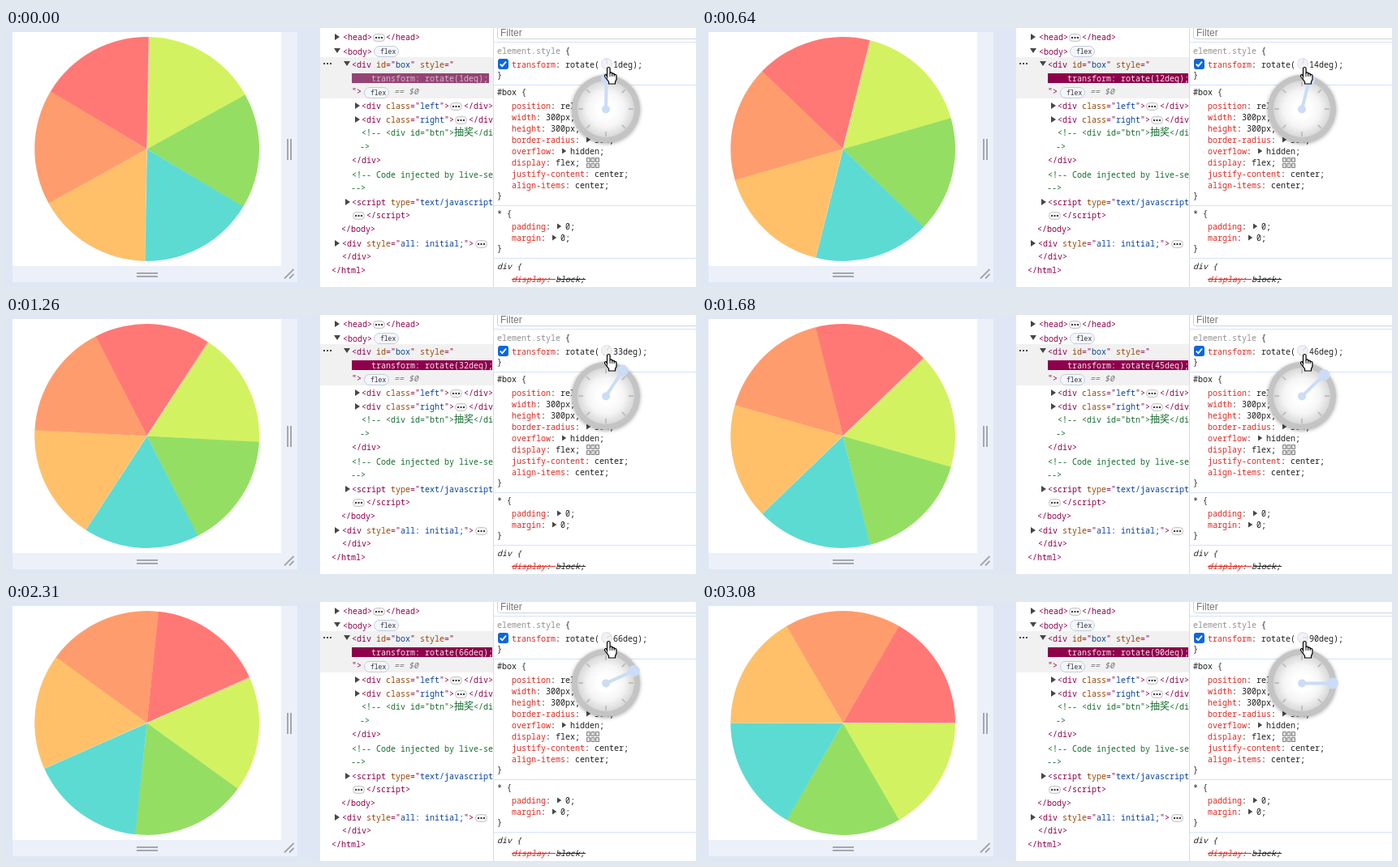
Write an HTML page with a canvas that moves like this. It is 850x320 px and loops after 3150 ms.

```html
<!DOCTYPE html>
<html lang="en">
<head>
<meta charset="utf-8">
<title>Rotating wheel</title>
<style>
  html, body { margin: 0; width: 100%; height: 100%; overflow: hidden; background: #dfe7f5; }
  canvas { display: block; }
</style>
</head>
<body>
<canvas id="stage" width="850" height="320"></canvas>
<script>
const ctx = document.getElementById('stage').getContext('2d');
const LOOP = 3150;
const MONO = '10px "Noto Sans Mono", "DejaVu Sans Mono", monospace';
const CJK = '12px "Noto Sans CJK SC", "Noto Sans CJK", sans-serif';
const C = {
  tag: '#8e004b', attr: '#994500', value: '#0842a0', note: '#146c2e',
  prop: '#dc2a22', ink: '#1f1f1f', dim: '#919191', rule: '#d3e3fd'
};
const SLICES = ['#d3f261', '#95de64', '#5cdbd3', '#ffc069', '#ff9c6e', '#ff7875'];
const RAD = Math.PI / 180;

// Time and value pairs for the live angle and the slightly late markup.
const ANGLE = [[90, 1], [350, 5], [920, 22], [1680, 46], [2310, 66], [2590, 75], [3080, 90]];
const MARKUP = [[160, 1], [350, 3], [920, 21], [1680, 45], [2310, 66], [2590, 74], [3080, 90]];
const STEPS = [0, 160, 220, 280, 350, 420, 490, 570, 640, 710, 780, 850, 920, 990, 1060, 1120, 1190];

function snap(t) {
  if (t >= 1260) return 1260 + Math.floor((t - 1260) / 70) * 70;
  return STEPS.filter(s => s <= t).pop();
}

function valueAt(keys, t) {
  if (t <= keys[0][0]) return keys[0][1];
  for (let i = 1; i < keys.length; i++) {
    const [t0, a] = keys[i - 1], [t1, b] = keys[i];
    if (t <= t1) return Math.round(a + (b - a) * (t - t0) / (t1 - t0));
  }
  return keys[keys.length - 1][1];
}

function box(x, y, w, h, color) {
  ctx.fillStyle = color;
  ctx.fillRect(x, y, w, h);
}

function disc(x, y, r, color) {
  ctx.fillStyle = color;
  ctx.beginPath();
  ctx.arc(x, y, r, 0, Math.PI * 2);
  ctx.fill();
}

function stroke(points, color, width) {
  ctx.strokeStyle = color;
  ctx.lineWidth = width;
  ctx.beginPath();
  points.forEach(([x, y]) => ctx.lineTo(x, y));
  ctx.stroke();
}

function pill(x, y, w, h, r, fill, edge) {
  ctx.beginPath();
  ctx.roundRect(x + 0.5, y + 0.5, w - 1, h - 1, r);
  ctx.fillStyle = fill;
  ctx.fill();
  ctx.strokeStyle = edge;
  ctx.lineWidth = 1;
  ctx.stroke();
}

// y is the middle of the row; returns the x where the text ends.
function text(x, y, str, color, font = MONO) {
  ctx.font = font;
  ctx.fillStyle = color;
  ctx.fillText(str, x, y + 4);
  return x + ctx.measureText(str).width;
}

function markup(x, y, str) {
  for (const part of str.split(/("[^"]*"?|\w+(?==))/)) {
    if (part[0] === '"') {
      const inner = part.replace(/"/g, '');
      x = text(x, y, '"', C.tag);
      x = text(x, y, inner, C.value);
      if (part.length > inner.length + 1) x = text(x, y, '"', C.tag);
    } else {
      x = text(x, y, part, /^\w+$/.test(part) ? C.attr : C.tag);
    }
  }
}

function arrow(x, y, open, r = 4) {
  ctx.fillStyle = '#474747';
  ctx.beginPath();
  if (open) {
    ctx.moveTo(x, y - 3); ctx.lineTo(x + 8, y - 3); ctx.lineTo(x + 4, y + 3);
  } else {
    ctx.moveTo(x + 1, y - r); ctx.lineTo(x + 1 + r * 1.5, y); ctx.lineTo(x + 1, y + r);
  }
  ctx.fill();
}

function dots(x, y) {
  pill(x, y - 4, 15, 10, 4, '#f3f3f3', '#c4c4c4');
  for (let i = 0; i < 3; i++) box(x + 3 + i * 3.5, y, 2, 2, '#3c3c3c');
}

function flexBadge(x, y) {
  pill(x, y, 31, 14, 6.5, '#f3f6fc', '#c4cddc');
  text(x + 8, y + 6, 'flex', '#333', '8px "Noto Sans Mono", "DejaVu Sans Mono", monospace');
}

function clip(x, w, draw) {
  ctx.save();
  ctx.beginPath();
  ctx.rect(x, 0, w, 320);
  ctx.clip();
  draw();
  ctx.restore();
}

function drawWheel(angle) {
  const r = 138.4;
  ctx.save();
  ctx.translate(173.6, 149.5);
  ctx.rotate((angle - 90) * RAD);
  SLICES.forEach((color, i) => {
    ctx.fillStyle = color;
    ctx.beginPath();
    ctx.moveTo(0, 0);
    ctx.arc(0, 0, r, i * 60 * RAD, (i * 60 + 60.2) * RAD);
    ctx.fill();
  });
  // Pale seam where the two halves meet.
  stroke([[0, 0], [r, 0]], 'rgba(255,255,255,.55)', 1);
  stroke([[0, 0], [-r, 0]], 'rgba(255,255,255,.25)', 1);
  ctx.restore();
}

function drawPage(angle) {
  box(0, 0, 387, 320, '#dfe7f5');
  box(8, 5, 351, 309, '#ecf1f9');
  box(8, 5, 331, 289, '#fff');
  drawWheel(angle);
  for (const d of [0, 4]) {
    box(346 + d, 137, 2, 26, '#a3a7ae');
    box(161, 302 + d, 26, 2, '#a3a7ae');
  }
  stroke([[343, 309.5], [354.5, 298]], '#a0a4aa', 1.8);
  stroke([[349, 309.5], [354.5, 304]], '#a0a4aa', 1.8);
}

function drawElements(deg, fresh) {
  box(387, 0, 213, 320, '#fff');
  box(387, 36, 213, 51, '#f1f1f2');

  arrow(404, 11); markup(415, 11, '<head>'); dots(452, 11); markup(468, 11, '</head>');
  arrow(404, 28, true); markup(415, 29, '<body>'); flexBadge(453, 22);
  for (let i = 0; i < 3; i++) box(391 + i * 4, 43, 2, 2, '#474747');
  arrow(416, 44, true); markup(426, 45, '<div id="box" style="');

  const code = `transform: rotate(${deg}deg);`;
  box(426, 56, deg > 9 ? 173 : 169, 12, fresh ? '#8e004b' : '#944473');
  text(450, 62, code, fresh ? '#f7e3ee' : '#d8b9cb');

  text(426, 78, '">', C.tag); flexBadge(441, 73);
  text(478, 78, '== $0', '#757575', 'italic ' + MONO);

  arrow(429, 96); markup(438, 96, '<div class="left">'); dots(547, 96); markup(564, 96, '</div>');
  arrow(429, 113); markup(438, 113, '<div class="right">'); dots(553, 113); markup(570, 113, '</div>');
  let x = text(438, 129, '<!-- <div id="btn">', C.note);
  x = text(x, 129, '抽奖', C.note, CJK);
  text(x, 129, '</div>', C.note);
  text(436, 146, '->', C.note);
  markup(426, 163, '</div>');
  text(426, 181, '<!-- Code injected by live-server', C.note);
  text(425, 197, '-->', C.note);
  arrow(417, 215); markup(426, 215, '<script type="text/javascript"');
  dots(427, 231); markup(444, 231, '<' + '/script>');
  markup(413, 248, '</body>');
  arrow(404, 266); markup(414, 266, '<div style="all: initial;">'); dots(578, 266);
  markup(414, 282, '</div>');
  markup(401, 299, '</html>');
}

function rule(y, name, value, expand) {
  let x = text(623, y, name, C.prop);
  x = text(x, y, ':', C.ink) + 6;
  if (expand) {
    arrow(x + 1, y, false, 3.5);
    x += 12;
  }
  return text(x, y, value, C.ink);
}

function drawStyles(angle) {
  box(600, 0, 250, 320, '#fff');
  box(600, 0, 1, 320, '#cfdcf0');
  pill(605, -12, 260, 26, 3, '#fff', '#cdd3dd');
  text(609, 6, 'Filter', '#757575', '12px "Liberation Sans", Arial, sans-serif');
  for (const y of [17, 70, 219, 284]) box(601, y, 249, 1, C.rule);

  text(text(605, 28, 'element.style', C.dim) + 6, 28, '{', C.ink);
  pill(606, 38, 13, 13, 2, '#0b67dd', '#0b67dd');
  stroke([[608.8, 44.7], [611.3, 47.2], [616, 41.7]], '#fff', 1.8);
  rule(45, 'transform', 'rotate(');
  disc(740, 44, 7, '#dfe2e8');
  disc(740, 44, 5.8, '#f1f2f5');
  ctx.save();
  ctx.translate(740, 44);
  ctx.rotate(angle * RAD);
  stroke([[0, 0], [0, -6]], '#d5dce8', 1.2);
  ctx.restore();
  text(748, 45, angle + 'deg);', C.ink);
  text(605, 58, '}', C.ink);

  text(605, 79, '#box {', C.ink);
  rule(96, 'position', 'relative;');
  rule(110, 'width', '300px;');
  rule(124, 'height', '300px;');
  rule(138, 'border-radius', '50%;', true);
  rule(152, 'overflow', 'hidden;', true);
  rule(166, 'display', 'flex;');
  for (let i = 0; i < 6; i++) {
    pill(715 + (i % 3) * 5.5, 160 + Math.floor(i / 3) * 7, 5, 6, 0, '#ddd', '#858585');
  }
  rule(180, 'justify-content', 'center;');
  rule(194, 'align-items', 'center;');
  text(605, 207, '}', C.ink);

  text(605, 229, '* {', C.ink);
  rule(245, 'padding', '0;', true);
  rule(259, 'margin', '0;', true);
  text(605, 272, '}', C.ink);

  const italic = 'italic ' + MONO;
  text(605, 294, 'div {', C.ink, italic);
  text(623, 310, 'display', C.prop, italic);
  text(665, 310, ': block;', C.ink, italic);
  box(623, 310, 54, 1, C.prop);
  box(680, 310, 34, 1, C.ink);
}

function drawDial(angle) {
  ctx.save();
  ctx.translate(739, 100);
  ctx.shadowColor = 'rgba(0,0,0,.35)';
  ctx.shadowBlur = 5;
  ctx.shadowOffsetY = 1;
  disc(0, 0, 42, '#c4c4c4');
  ctx.shadowColor = 'transparent';
  const face = ctx.createRadialGradient(0, 0, 10, 0, 0, 35);
  face.addColorStop(0, '#fff');
  face.addColorStop(0.5, '#f5f5f5');
  face.addColorStop(1, '#d8d8d8');
  disc(0, 0, 35, face);
  for (let i = 0; i < 8; i++) {
    stroke([[0, -28], [0, -34]], '#bdbdbd', 1.8);
    ctx.rotate(45 * RAD);
  }
  ctx.translate(0, 0.4);
  ctx.rotate(angle * RAD);
  stroke([[0, 0], [0, -38]], '#cbdcf5', 4);
  disc(0, 0, 5, '#cbdcf5');
  disc(0, -38, 7, '#cbdcf8');
  ctx.restore();
}

function drawCursor() {
  const hand = new Path2D('M740.5 60V50.5q0-2 1.8-2t1.8 2V55.5q1.2-1.2 2.6 0v1q1.3-1 2.5 .2v1' +
    'q2.8-.7 2.8 1.8v4l-1.5 3v2.5h-8v-2.5l-4.5-6q-1.2-2 .2-2.7t2.3 2.2z');
  ctx.fillStyle = '#fff';
  ctx.fill(hand);
  ctx.strokeStyle = '#000';
  ctx.lineWidth = 1.2;
  ctx.stroke(hand);
  for (const x of [744.1, 746.7, 749.2]) stroke([[x, 56], [x, 60]], '#000', 0.9);
}

function draw(now) {
  const t = snap(now % LOOP);
  const angle = valueAt(ANGLE, t);
  drawPage(angle);
  clip(387, 213, () => drawElements(valueAt(MARKUP, t), t > 0));
  clip(600, 250, () => drawStyles(angle));
  drawDial(angle);
  drawCursor();
}

const start = performance.now();
function tick() {
  draw(performance.now() - start);
  requestAnimationFrame(tick);
}
tick();
</script>
</body>
</html>
```
